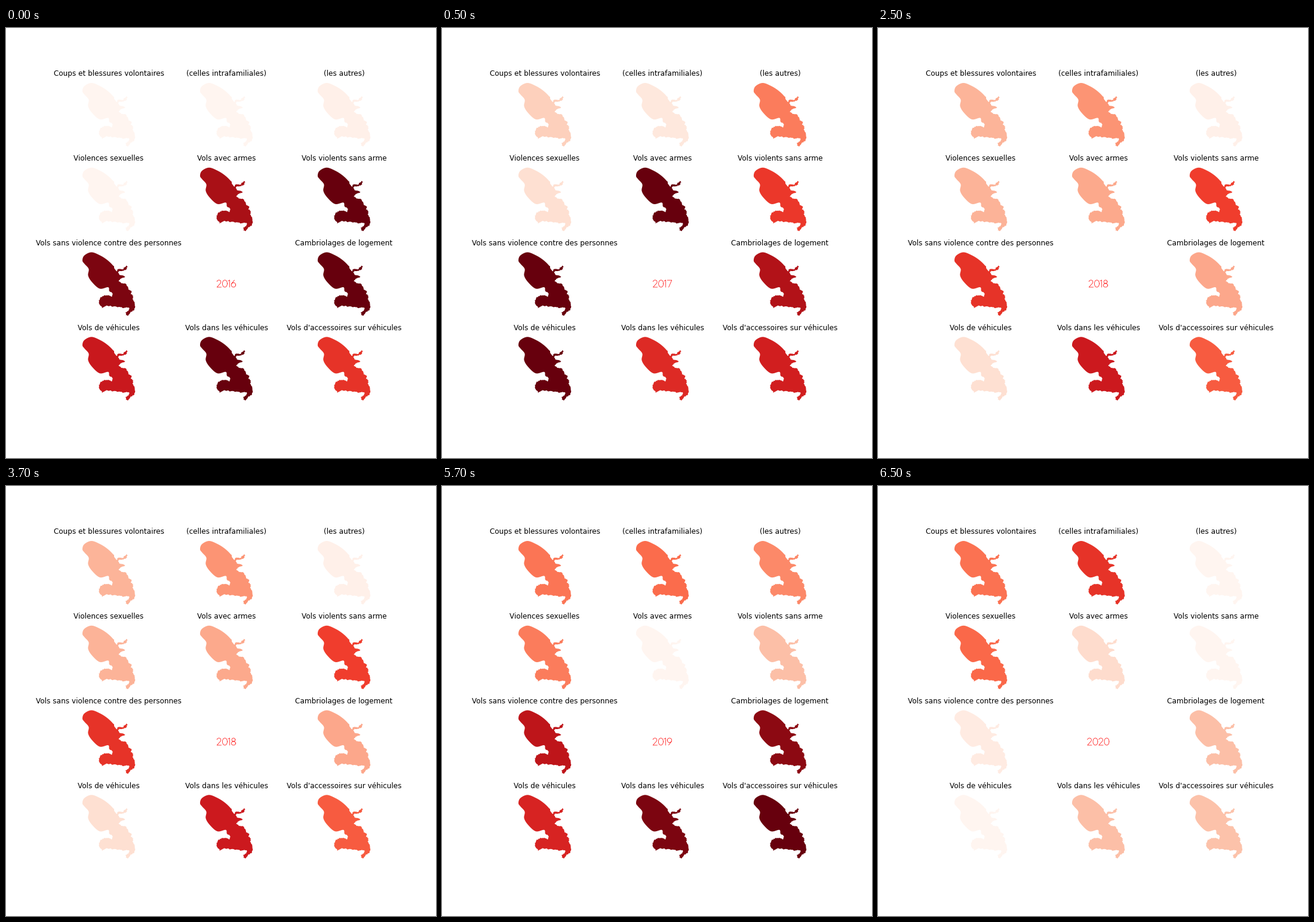
A matplotlib script that plays this animation: 720 px wide and 720 px high, repeating every 8 s.

```python
import numpy as np
import matplotlib.pyplot as plt
from matplotlib.animation import FuncAnimation

SIZE = 720
COL_X, COL_STEP = 172.1, 196.94
ROW_STEP = 141.75
YEAR_BASE = 434.0
FIRST_YEAR = 2016

# Each title with its colour map level per year
PANELS = [
    ("Coups et blessures volontaires", [0, .18, .27, .465, .475]),
    ("(celles intrafamiliales)", [0, .08, .37, .495, .655]),
    ("(les autres)", [.03, .445, .03, .405, 0]),
    ("Violences sexuelles", [0, .125, .275, .445, .505]),
    ("Vols avec armes", [.86, 1, .305, 0, .14]),
    ("Vols violents sans arme", [1, .64, .62, .235, 0]),
    ("Vols sans violence contre des personnes", [.955, 1, .655, .79, .06]),
    None,
    ("Cambriolages de logement", [1, .83, .31, .925, .235]),
    ("Vols de véhicules", [.755, 1, .125, .71, 0]),
    ("Vols dans les véhicules", [1, .685, .745, .955, .235]),
    ("Vols d'accessoires sur véhicules", [.655, .73, .54, 1, .23]),
]

# Key points of the island in the first panel, clockwise from the north-west
COAST = [
    (128, 106), (131, 97.5), (143, 92), (157, 97), (169, 104.5), (179, 114),
    (185, 124), (188, 120), (195, 120.5), (202, 114.5), (202, 120),
    (195, 123), (189, 123), (189, 129), (199, 132.5), (191, 137), (190, 142),
    (200, 145), (203, 148), (205, 154), (211, 157), (209, 161), (213, 165),
    (212, 170), (215, 177), (215, 188), (209, 192), (204, 198), (200, 194),
    (206, 189), (205, 184), (198, 185), (184, 183.5), (168, 181.5), (161, 185),
    (155.5, 174.5), (160, 166.5), (170, 164), (177, 166), (178, 161),
    (173, 157), (171, 150.5), (157, 153), (144, 142), (137.5, 131),
    (138.5, 120), (131.5, 111.5),
]


def spline(points, steps=6):
    """Closed Catmull-Rom curve through the points."""
    b = np.array(points, float)[:, None]
    a, c, d = (np.roll(b, shift, axis=0) for shift in (1, -1, -2))
    t = (np.arange(steps) / steps)[None, :, None]
    curve = b + t / 2 * (c - a + t * (2 * a - 5 * b + 4 * c - d
                                      + t * (3 * (b - c) + d - a)))
    return curve.reshape(-1, 2)


def fray(curve, amount=.85):
    """Roughen the eastern and southern shores only."""
    rng = np.random.default_rng(4)
    ragged = (curve[:, 0] > 180) | (curve[:, 1] > 158)
    return curve + rng.uniform(-amount, amount, curve.shape) * ragged[:, None]


def arc(cx, cy, rx, ry, start=0, end=360):
    t = np.radians(np.linspace(start, end, 40))
    return np.column_stack([cx + rx * np.cos(t), cy + ry * np.sin(t)])


SIX = [np.array([(5.8, 11.8), (1.3, 5.9)]), arc(4.4, 3.8, 3.7, 3.8)]

# Thin digits: advance width and strokes, y pointing up from the baseline
DIGITS = {
    "0": (10, [arc(4.9, 6, 4, 6)]),
    "1": (5, [np.array([(.4, 10.4), (2.9, 12), (2.9, 0)])]),
    "2": (9, [np.vstack([arc(4, 8.7, 3.3, 3.3, 170, -38), [(.7, 0), (7.9, 0)]])]),
    "6": (9, SIX),
    "7": (8.5, [np.array([(.5, 11.8), (7.9, 11.8), (2.8, 0)])]),
    "8": (9, [arc(4.4, 9.1, 2.9, 2.9), arc(4.4, 3.1, 3.7, 3.1)]),
    "9": (9, [np.array([8.8, 12]) - s for s in SIX]),
}


def year_strokes(year):
    text = str(year)
    x = COL_X + COL_STEP - sum(DIGITS[c][0] for c in text) / 2
    parts = []
    for c in text:
        advance, strokes = DIGITS[c]
        for s in strokes:
            parts += [np.column_stack([x + s[:, 0], YEAR_BASE - s[:, 1]]),
                      [(np.nan, np.nan)]]
        x += advance
    return np.vstack(parts).T


fig = plt.figure(figsize=(SIZE / 72, SIZE / 72), dpi=72, facecolor="white")
ax = fig.add_axes([0, 0, 1, 1])
ax.set(xlim=(0, SIZE), ylim=(SIZE, 0))
ax.axis("off")

outline = fray(spline(COAST))
islands = []
for i, panel in enumerate(PANELS):
    if panel is None:
        continue
    title, levels = panel
    row, col = divmod(i, 3)
    dx, dy = col * COL_STEP, row * ROW_STEP
    ax.text(COL_X + dx, 80.4 + dy, title, fontsize=12, family="DejaVu Sans",
            ha="center", va="baseline")
    shape, = ax.fill(*(outline + (dx, dy)).T, lw=0)
    islands.append((shape, plt.cm.Reds(np.array(levels, float))))

year_line, = ax.plot([], [], color="red", lw=.7)


def update(n):
    step = (n + 3) // 4
    for shape, colors in islands:
        shape.set_facecolor(colors[step])
    year_line.set_data(*year_strokes(FIRST_YEAR + step))
    return [year_line]


anim = FuncAnimation(fig, update, frames=16, interval=500, repeat=True,
                     repeat_delay=0, blit=False)
plt.show()
```
